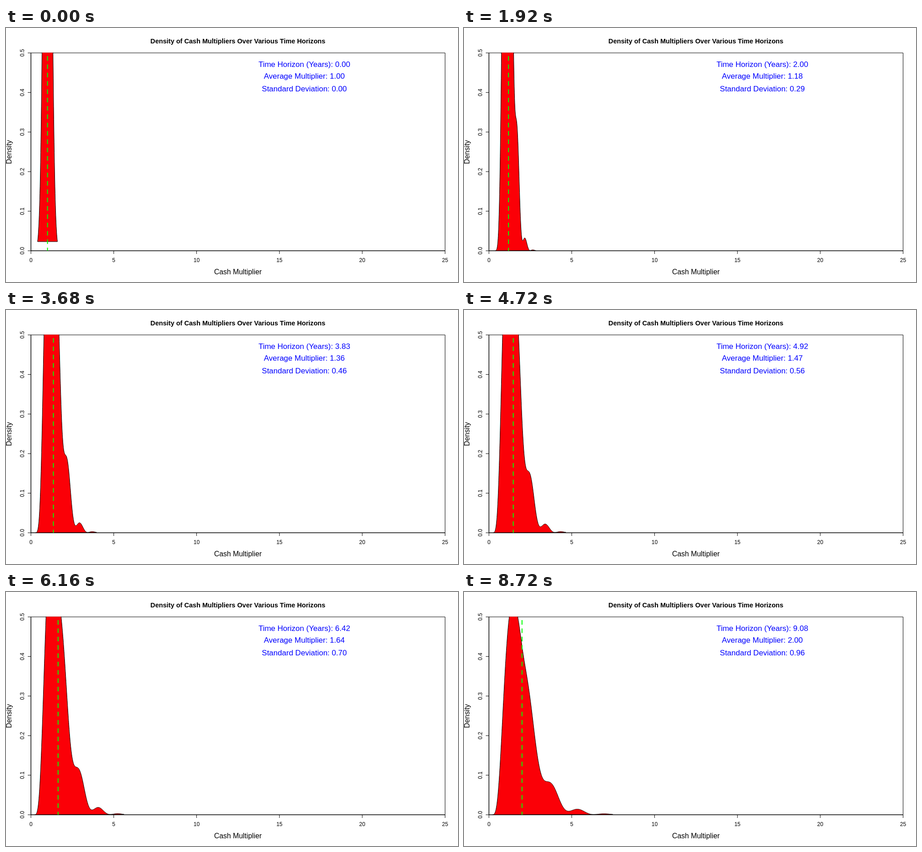
Animation, 997 px wide and 561 px high, one loop 8800 ms. Source, as an HTML page:

```html
<!DOCTYPE html>
<html lang="en">
<head>
<meta charset="utf-8">
<title>Density of Cash Multipliers</title>
<style>
  html, body { margin: 0; height: 100%; overflow: hidden; background: #fff; }
  svg { display: block; width: 997px; height: 561px; }
  text { font: 12px "Liberation Sans", Arial, sans-serif; text-anchor: middle; }
  .title { font-size: 14.6px; font-weight: bold; }
  .label { font-size: 15.9px; }
  .stat { font-size: 17.05px; fill: #00f; }
  path { fill: none; stroke: #000; }
  #area { fill: #fb0007; stroke-linejoin: round; }
  #mean { stroke: #0f0; stroke-width: 2; stroke-dasharray: 10.2 8.2; }
</style>
</head>
<body>
<svg viewBox="0 0 997 561">
  <clipPath id="plot"><rect x="54.5" y="54.5" width="914.5" height="438"/></clipPath>
  <text class="title" x="511.5" y="34">Density of Cash Multipliers Over Various Time Horizons</text>
  <text class="label" x="511.5" y="544.3">Cash Multiplier</text>
  <text class="label" transform="translate(12 274) rotate(-90)">Density</text>
  <g id="axes"><path d="M55 55H968.5V492H55Z"/></g>
  <g clip-path="url(#plot)"><path id="area"/></g>
  <path id="mean"/>
  <text class="stat" x="658" y="85.6"></text>
  <text class="stat" x="658" y="112"></text>
  <text class="stat" x="658" y="140"></text>
</svg>
<script>
const STEP = 80, FRAMES = 110;
const px = x => 55 + x * 36.54;
const py = density => 492 - density * 874;
const area = document.getElementById('area');
const meanLine = document.getElementById('mean');
const stats = document.querySelectorAll('.stat');

let axes = `<path d="M55 ${py(.5)}V${py(0)}H${px(25)}"/>`;
for (let i = 0; i < 6; i++) {
  const x = px(i * 5), y = py(i / 10);
  axes += `<path d="M${x} 492v7M55 ${y}h-7"/><text x="${x}" y="517">${i * 5}</text>` +
    `<text transform="translate(39.5 ${y}) rotate(-90)">${(i / 10).toFixed(1)}</text>`;
}
document.getElementById('axes').innerHTML += axes;

const bell = z => Math.exp(-z * z / 2) / Math.sqrt(2 * Math.PI);

// With no spread yet, the estimate is a single kernel cut at three bandwidths.
function kernel(x) {
  const bandwidth = .201, z = (x - 1) / bandwidth;
  return Math.abs(z) > 3 ? 0 : bell(z) / bandwidth;
}

// Log-normal body whose right tail ripples more the further out it gets.
function logNormal(mean, sd) {
  const variance = Math.log(1 + (sd / mean) ** 2);
  const sigma = Math.sqrt(variance), mu = Math.log(mean) - variance / 2;
  return x => {
    const u = (x - mean) / sd;
    if (x <= 0 || u > 5.7) return 0;
    const ripple = Math.min(.8, .18 * Math.max(0, u)) * Math.cos(2 * Math.PI * (u - .35) / 1.65);
    return bell((Math.log(x) - mu) / sigma) / (x * sigma) * (1 + ripple);
  };
}

function draw(years) {
  const mean = 1 + years * (.0892 + .00025 * years ** 2);
  const sd = Math.sqrt(years) * (.173 + .0161 * years);
  const density = years ? logNormal(mean, sd) : kernel;
  const outline = [];
  for (let x = 0; x < 9; x += .01) {
    const d = density(x);
    if (d > 1e-4) outline.push(px(x).toFixed(2) + ' ' + py(d).toFixed(2));
  }
  area.setAttribute('d', 'M' + outline.join('L') + 'Z');
  meanLine.setAttribute('d', `M${px(mean)} 62V492`);
  stats[0].textContent = `Time Horizon (Years): ${years.toFixed(2)}`;
  stats[1].textContent = `Average Multiplier: ${mean.toFixed(2)}`;
  stats[2].textContent = `Standard Deviation: ${sd.toFixed(2)}`;
}

let shown = -1;
function tick() {
  const month = Math.floor(performance.now() / STEP) % FRAMES;
  if (month !== shown) draw((shown = month) / 12);
  requestAnimationFrame(tick);
}
tick();
</script>
</body>
</html>
```
